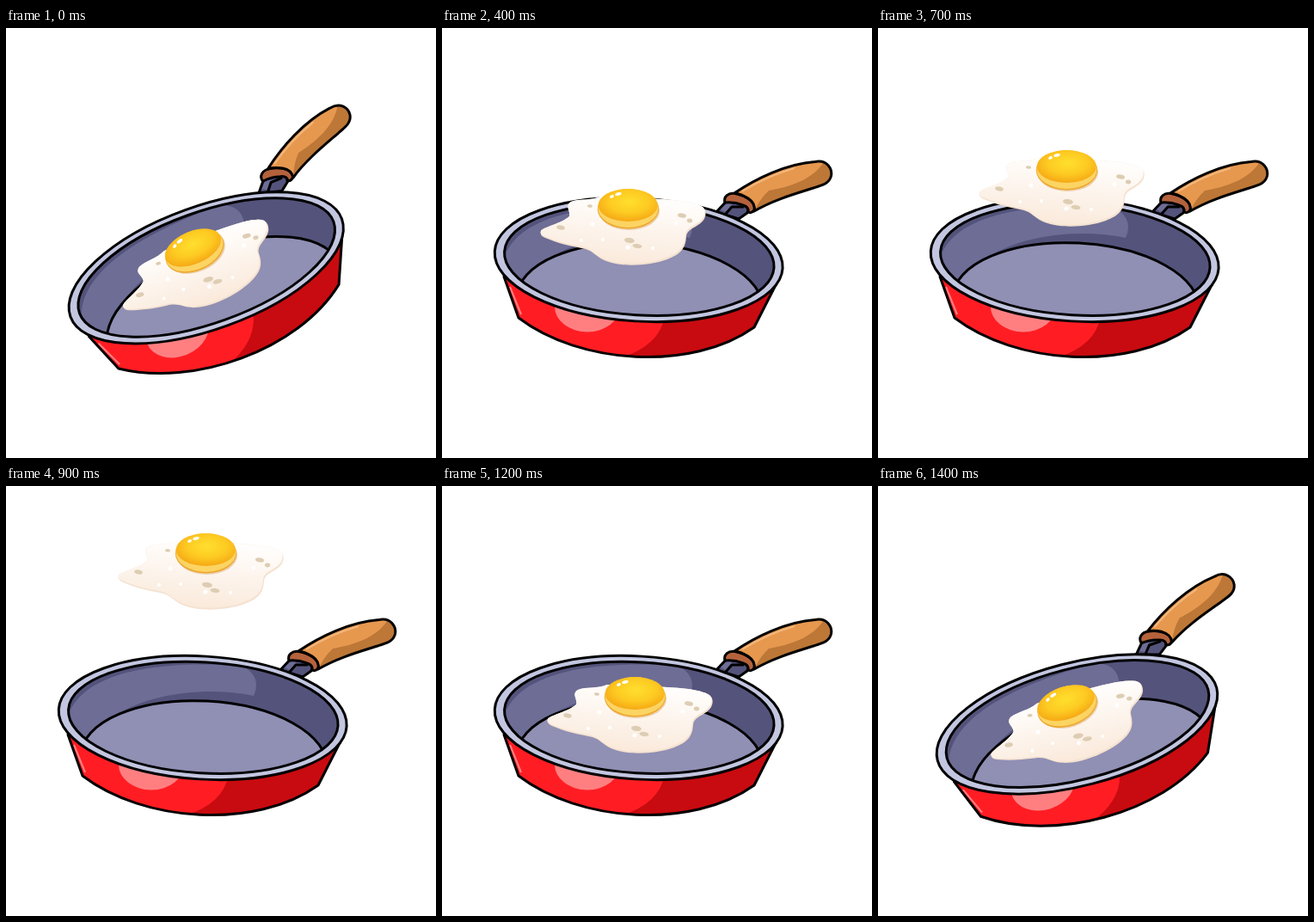
An HTML page for the animation above (1500 ms loop, 500x500 px).

```html
<!DOCTYPE html>
<html lang="en">
<head>
<meta charset="utf-8">
<title>Tossed egg</title>
<style>
  html, body { margin: 0; width: 100%; height: 100%; overflow: hidden; background: #fff; }
  svg { display: block; width: 100vw; height: 100vh; }
  .line { stroke: #000; stroke-width: 3; stroke-linejoin: round; stroke-linecap: round; }
</style>
</head>
<body>
<svg viewBox="0 0 500 500">
  <defs>
    <path id="bodyShape" d="M72 289L89 337C160 391 290 400 363 348L393 289Z"/>
    <path id="handleShape" d="M340 192C365 175 400 158 434 155.500C448 153 454 164 452.500 172C450 182 440 183 432 186C410 193 385 200 363 213Q365 204 356 198Q348 193 340 192Z"/>
    <ellipse id="innerShape" cx="229.300" cy="269.300" rx="157" ry="64.500" transform="rotate(3.400 229.300 269.300)"/>
    <path id="whiteShape" d="M123 271C124 267 148 262 156 254C158 248 150 242 158 237C168 233 181 236 192 231C215 233 285 232 304 240C316 243 316 251 313 257C307 267 293 267 292 278C291 292 285 298 270 304C248 312 216 313 199 306C186 301 184 293 170 291C155 288 142 285 128 279Q121 276 123 271Z"/>
    <clipPath id="bodyClip"><use href="#bodyShape"/></clipPath>
    <clipPath id="handleClip"><use href="#handleShape"/></clipPath>
    <clipPath id="innerClip"><use href="#innerShape"/></clipPath>
    <clipPath id="whiteClip"><use href="#whiteShape"/></clipPath>
    <linearGradient id="whiteFill" x1=".6" y1="0" x2=".4" y2="1">
      <stop offset=".1" stop-color="#fffdfb"/>
      <stop offset="1" stop-color="#fae9da"/>
    </linearGradient>
    <radialGradient id="yolkFill" cx=".52" cy=".4" r=".62">
      <stop offset="0" stop-color="#ffdf2e"/>
      <stop offset=".55" stop-color="#fdca22"/>
      <stop offset="1" stop-color="#f5a614"/>
    </radialGradient>
  </defs>

  <g id="pan">
    <path class="line" fill="#54537b" d="M319 214L331 201L357 206L355 215L345 222Z"/>
    <path fill="#6d6d96" d="M324 211L332 203L338 205L330 214Z"/>
    <path class="line" fill="none" d="M330 216L337 208L350 208"/>
    <path class="line" fill="#b4623c" d="M329 203C327 196 333 191 341 192.500C354 195 366 203 363 212Q360 216 356 214Q357 208 350 206Q340 202 329 203Z"/>
    <use href="#handleShape" fill="#e6984f"/>
    <path clip-path="url(#handleClip)" fill="#bd7737" d="M446 152C434 176 404 185 380 189Q368 200 361 218L460 200L465 150Z"/>
    <path fill="none" stroke="#f3b77c" stroke-width="2" d="M349 190Q378 172 410 163"/>
    <use href="#handleShape" class="line" fill="none"/>

    <use href="#bodyShape" fill="#ff1d23"/>
    <g clip-path="url(#bodyClip)">
      <path fill="#c80b10" d="M259 335Q253 370 206 384L300 405L400 350V270Z"/>
      <ellipse fill="#ff7f81" cx="169" cy="324" rx="38" ry="29.500"/>
      <path fill="none" stroke="#ff7f81" stroke-width="2" d="M79 301L92 333"/>
    </g>
    <use href="#bodyShape" class="line" fill="none"/>

    <ellipse class="line" fill="#c3c6e0" cx="228.700" cy="269.500" rx="167.700" ry="71.500" transform="rotate(3.400 228.700 269.500)"/>
    <use href="#innerShape" fill="#54537b"/>
    <g clip-path="url(#innerClip)">
      <path fill="#6d6d96" d="M70 305C56 226 145 201 274 209Q298 221 288 244C220 230 130 245 92 298Z"/>
      <ellipse class="line" fill="#908fb4" cx="230" cy="319.500" rx="143" ry="69.500" transform="rotate(3 230 319.500)"/>
    </g>
    <use href="#innerShape" class="line" fill="none"/>
  </g>

  <g id="egg">
    <use href="#whiteShape" fill="#f4e2d0"/>
    <g clip-path="url(#whiteClip)">
      <use href="#whiteShape" fill="url(#whiteFill)" transform="translate(-1 -2)"/>
    </g>
    <g id="spots"></g>
    <ellipse fill="#edcfac" cx="225.500" cy="247.500" rx="35.500" ry="22.500"/>
    <ellipse fill="#eda62b" cx="224.500" cy="245.500" rx="35.700" ry="23"/>
    <ellipse fill="#fcd463" cx="224.500" cy="244.600" rx="35" ry="22.300"/>
    <ellipse fill="url(#yolkFill)" cx="224.300" cy="241" rx="34.600" ry="19"/>
    <g fill="#fff">
      <ellipse cx="205.500" cy="231" rx="2.500" ry="1.700" transform="rotate(-25 205.500 231)"/>
      <ellipse cx="213" cy="228" rx="3.800" ry="1.800" transform="rotate(-15 213 228)"/>
    </g>
  </g>
</svg>
<script>
  const STEP = 100;
  const PIVOT = "253.5 264.4";
  // Pan angle, then egg offset x and y, for each step of the loop
  const POSES = [
    [-23.2, 0, 1], [-18, -4, -2], [-9.8, -8, -7], [-3.5, -8, -20], [0, -8, -35],
    [0, -7, -50], [0, -6, -65], [0, -5, -80], [0, 2, -167], [0, 8, -167],
    [0, 15, -80], [0, 8, -40], [0, 0, 0], [-9.8, 0, 0], [-18, 0, 1]
  ];
  const TAN = "#ddcdb3", WHITE = "#fff";
  const SPOTS = [
    [287, 253, 5, 2.6, TAN], [296, 259, 3.2, 2.4, TAN], [226, 282, 6, 3, TAN],
    [235, 288.5, 5.5, 2.6, TAN], [146, 267, 4.8, 2.6, TAN], [180, 242, 3, 1.8, TAN],
    [224, 290, 2.5, 2.5, WHITE], [195, 281, 2, 2, WHITE], [170, 282, 2, 2, WHITE],
    [183, 263, 2.5, 2.5, WHITE], [253, 291, 2, 2, WHITE], [280, 262, 2.5, 2.5, WHITE]
  ];
  const byId = id => document.getElementById(id);

  byId("spots").innerHTML = SPOTS.map(([x, y, rx, ry, color]) =>
    `<ellipse cx="${x}" cy="${y}" rx="${rx}" ry="${ry}" fill="${color}" transform="rotate(8 ${x} ${y})"/>`
  ).join("");

  const start = performance.now();
  function draw() {
    const step = Math.floor((performance.now() - start) / STEP) % POSES.length;
    const [angle, x, y] = POSES[step];
    const turn = `rotate(${angle} ${PIVOT})`;
    byId("pan").setAttribute("transform", turn);
    byId("egg").setAttribute("transform", `translate(${x} ${y}) ${turn}`);
    requestAnimationFrame(draw);
  }
  draw();
</script>
</body>
</html>
```
